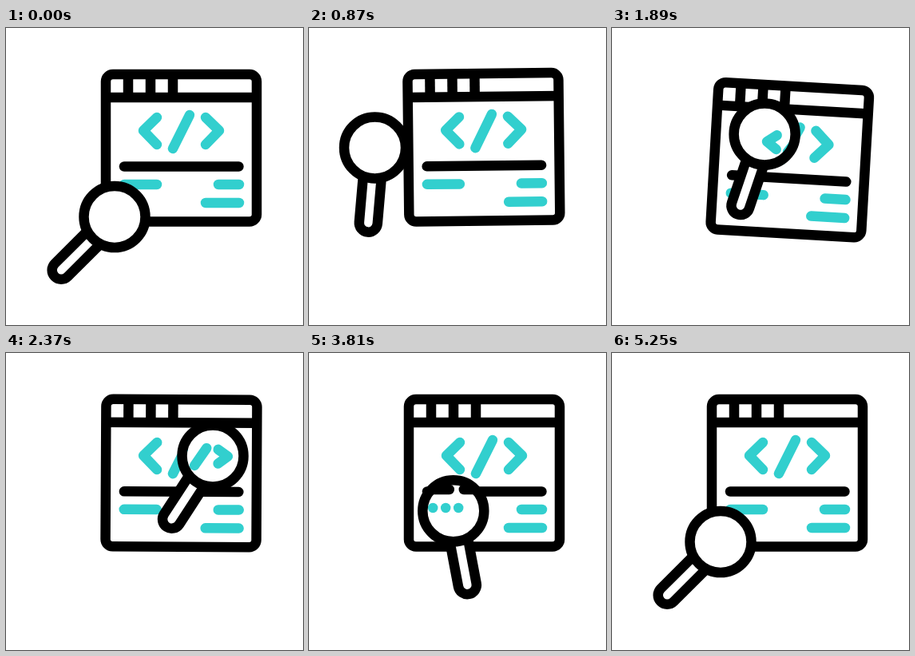
Animation of 372x372 px, one loop 5400 ms. Source, as an HTML page with a canvas:

```html
<!DOCTYPE html>
<html>
<head>
<meta charset="utf-8">
<style>
  html, body { margin: 0; width: 100%; height: 100%; overflow: hidden; background: #fff; }
  canvas { display: block; }
</style>
</head>
<body>
<canvas width="372" height="372"></canvas>
<script>
const ctx = document.querySelector('canvas').getContext('2d');
const LOOP = 5400, BLACK = '#000', TEAL = '#32cfce';

// [time, x, y, handle angle]
const LENS = [
  [120, 136, 236.5, 45], [510, 120, 198, 28.5], [690, 87, 166, 16],
  [870, 82.5, 150, 5], [1200, 91, 146, -2], [1260, 96.5, 145, -1],
  [1890, 191, 133, 18.6], [2370, 259, 129, 33], [2610, 263.5, 137.5, 37],
  [2790, 263.5, 137.5, 37], [3420, 175.5, 198, -13.3], [3690, 175.5, 198, -13.3],
  [4500, 263.5, 194.5, 30], [4590, 263.5, 194.5, 30], [4800, 248.5, 209, 40],
  [5250, 136, 236.5, 45]
];

// [time, dx, dy, rotation]
const PANE = [
  [120, 0, 0, 0], [690, 0, -15, 0], [1200, -2.5, 39.5, -2.8], [1260, -2.6, 41, -3],
  [1830, 3.5, 19, 3.5], [1890, 3.3, 15, 3.3], [2370, 0, 0.2, 0.3], [2610, 0, 0, 0]
];

const CODE = [
  [[189, 112], [172, 128.5], [189, 146]],
  [[230, 109], [209, 151]],
  [[250, 112], [267, 128.5], [250, 146]]
];
const ROWS = [[148, 189, 196], [266, 292, 196], [250, 292, 219]];

// Monotone cubic through the keys; pauses stay flat.
function slope(keys, i, c) {
  if (i < 1 || i > keys.length - 2) return 0;
  const d = j => (keys[j + 1][c] - keys[j][c]) / (keys[j + 1][0] - keys[j][0]);
  const a = d(i - 1), b = d(i);
  return a * b > 0 ? 2 * a * b / (a + b) : 0;
}

function pose(keys, t) {
  const last = keys.length - 1;
  if (t <= keys[0][0]) return keys[0].slice(1);
  if (t >= keys[last][0]) return keys[last].slice(1);
  const i = keys.findIndex(k => k[0] > t) - 1;
  const p = keys[i], q = keys[i + 1], h = q[0] - p[0], u = (t - p[0]) / h, v = 1 - u;
  return [1, 2, 3].map(c =>
    p[c] * v * v * (1 + 2 * u) + q[c] * u * u * (3 - 2 * u) +
    h * u * v * (slope(keys, i, c) * v - slope(keys, i + 1, c) * u));
}

function line(color, points, cap = 'round') {
  ctx.strokeStyle = color;
  ctx.lineCap = cap;
  ctx.beginPath();
  points.forEach(p => ctx.lineTo(...p));
  ctx.stroke();
}

function box(x, y, w, h, r) {
  ctx.strokeStyle = BLACK;
  ctx.fillStyle = '#fff';
  ctx.beginPath();
  ctx.roundRect(x, y, w, h, r);
  ctx.fill();
  ctx.stroke();
}

function placePane([dx, dy, rot]) {
  ctx.translate(219.5 + dx, 150 + dy);
  ctx.rotate(rot * Math.PI / 180);
  ctx.translate(-219.5, -150);
}

function drawPane() {
  box(125, 58, 189, 184.5, 9);
  line(BLACK, [[125, 87], [314, 87]], 'butt');
  for (const x of [153, 181, 209]) line(BLACK, [[x, 58], [x, 87]], 'butt');
  line(BLACK, [[148, 173.5], [291.5, 173.5]]);
  CODE.forEach(points => line(TEAL, points));
  ROWS.forEach(([a, b, y]) => line(TEAL, [[a, y], [b, y]]));
}

// What the glass shows: shrunken code, then rows turned to dots.
function drawView(t, cx) {
  if (t > 1260 && t < 3500) {
    const shrink = ([x, y]) => [cx + 13 + 0.72 * (x - cx), 129.5 + 0.52 * (y - 129.5)];
    CODE.forEach(points => line(TEAL, points.map(shrink)));
  }
  if (t > 2700 && t < 4950) {
    const near = x => cx + 0.78 * (x - cx);
    line(BLACK, [[near(148), 171], [Math.max(near(148), cx - 5), 171]]);
    line(BLACK, [[cx + 13, 171], [Math.max(near(292), cx + 13), 171]]);
    for (const [a, b, y] of ROWS) {
      const gaps = Math.round((b - a) / 20.5);
      for (let i = 0; i <= gaps; i++) {
        const x = near(a + (b - a) * i / gaps);
        line(TEAL, [[x, y - 2], [x + 0.01, y - 2]]);
      }
    }
  }
}

function draw(t) {
  const pane = pose(PANE, t), [x, y, angle] = pose(LENS, t);
  ctx.fillStyle = '#fff';
  ctx.fillRect(0, 0, 372, 372);
  ctx.lineWidth = 12.5;
  ctx.lineJoin = 'round';

  ctx.save();
  placePane(pane);
  drawPane();
  ctx.restore();

  ctx.save();
  ctx.translate(x, y);
  ctx.rotate(angle * Math.PI / 180);
  box(-11.5, 30, 23, 76, 11.5);
  ctx.restore();

  const ring = new Path2D();
  ring.arc(x, y, 38.5, 0, 7);
  ctx.fillStyle = '#fff';
  ctx.fill(ring);
  ctx.save();
  ctx.clip(ring);
  placePane(pane);
  drawView(t, x - pane[0]);
  ctx.restore();
  ctx.strokeStyle = BLACK;
  ctx.stroke(ring);
}

const start = performance.now();
function tick() {
  draw((performance.now() - start) % LOOP);
  requestAnimationFrame(tick);
}
tick();
</script>
</body>
</html>
```
